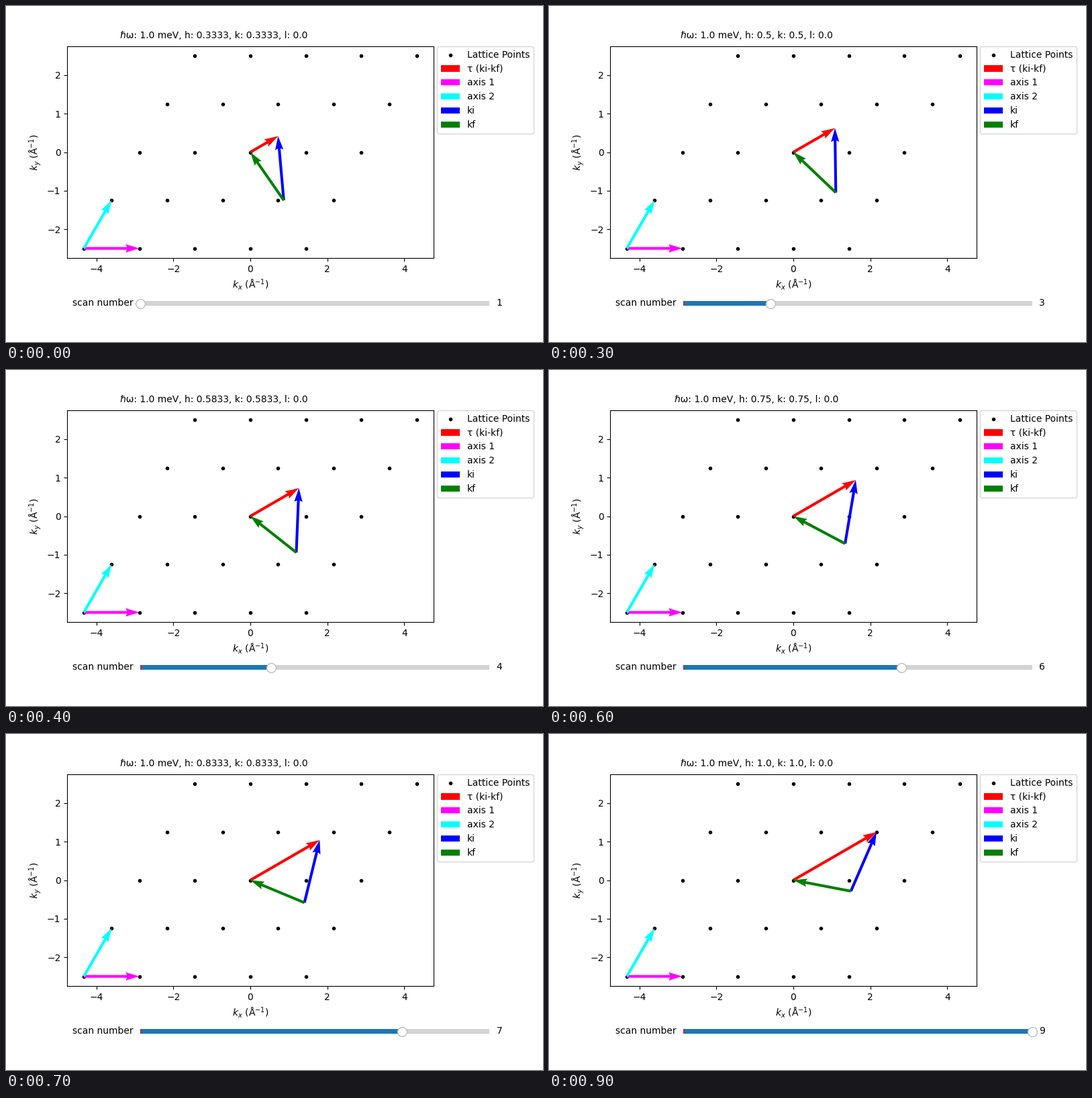
Animation, 800 px wide and 500 px high, one loop 1 s. Source, as a matplotlib script:

```python
import numpy as np
import matplotlib.pyplot as plt
from matplotlib.animation import FuncAnimation
from matplotlib.widgets import Slider

plt.rcParams["font.family"] = "DejaVu Sans"

# Reciprocal lattice and scattering condition
A_STAR = 1.4427
A1 = A_STAR * np.array([1, 0])
A2 = A_STAR * np.array([0.5, np.sqrt(3) / 2])
ENERGY = 1.0
KF = 1.523
KI2 = KF**2 + ENERGY / 2.0721
STEPS = 9

fig = plt.figure(figsize=(8, 5), dpi=100)
ax = fig.add_subplot()
fig.subplots_adjust(left=0.01, right=0.9, bottom=0.25, top=0.88)

n = np.arange(-2, 3)
points = np.array([i * A1 + j * A2 for i in n for j in n])
ax.scatter(points[:, 0], points[:, 1], color="black", marker=".",
           label="Lattice Points")

limit = 1.1 * points.max(axis=0)
ax.set_aspect("equal")
ax.set_xlim(-limit[0], limit[0])
ax.set_ylim(-limit[1], limit[1])
ax.set_xticks([-4, -2, 0, 2, 4])
ax.set_yticks([-2, -1, 0, 1, 2])
ax.set_xlabel("$k_x$ (Å$^{-1}$)")
ax.set_ylabel("$k_y$ (Å$^{-1}$)")


def arrow(start, vec, color, label):
    return ax.quiver(*start, *vec, color=color, label=label,
                     angles="xy", scale_units="xy", scale=1)


def move(quiver, start, vec):
    quiver.set_offsets([start])
    quiver.set_UVC([vec[0]], [vec[1]])


def scan_state(scan):
    """Return h, the momentum transfer and the common tail of ki and kf."""
    h = 1 / 3 + (scan - 1) / 12
    q = h * (A1 + A2)
    size = np.hypot(*q)
    unit = q / size
    along = (size**2 + KF**2 - KI2) / (2 * size)
    across = np.sqrt(KF**2 - along**2)
    tail = along * unit + across * np.array([unit[1], -unit[0]])
    return h, q, tail


origin = np.zeros(2)
corner = -2 * (A1 + A2)
_, q0, tail0 = scan_state(1)
tau = arrow(origin, q0, "red", "τ (ki-kf)")
arrow(corner, A1, "magenta", "axis 1")
arrow(corner, A2, "cyan", "axis 2")
ki = arrow(tail0, q0 - tail0, "blue", "ki")
kf = arrow(tail0, -tail0, "green", "kf")

ax.legend(loc="upper left", bbox_to_anchor=(1.01, 1), borderaxespad=0)
title = ax.text(0.4, 1.05, "", transform=ax.transAxes,
                ha="center", va="center")

slider_ax = fig.add_axes([0.25, 0.1, 0.65, 0.03])
slider = Slider(slider_ax, "scan number", 1, STEPS, valinit=1, valstep=1,
                valfmt="%d")
slider.drawon = False


def update(frame):
    scan = max(1, frame)  # the first position is held twice as long
    h, q, tail = scan_state(scan)
    move(tau, origin, q)
    move(ki, tail, q - tail)
    move(kf, tail, -tail)
    hk = round(h, 4)
    title.set_text(f"\u210fω: {ENERGY} meV, h: {hk}, k: {hk}, l: 0.0")
    slider.set_val(scan)
    return tau, ki, kf, title


anim = FuncAnimation(fig, update, frames=STEPS + 1, interval=100,
                     repeat=True, repeat_delay=0, blit=False)
plt.show()
```
